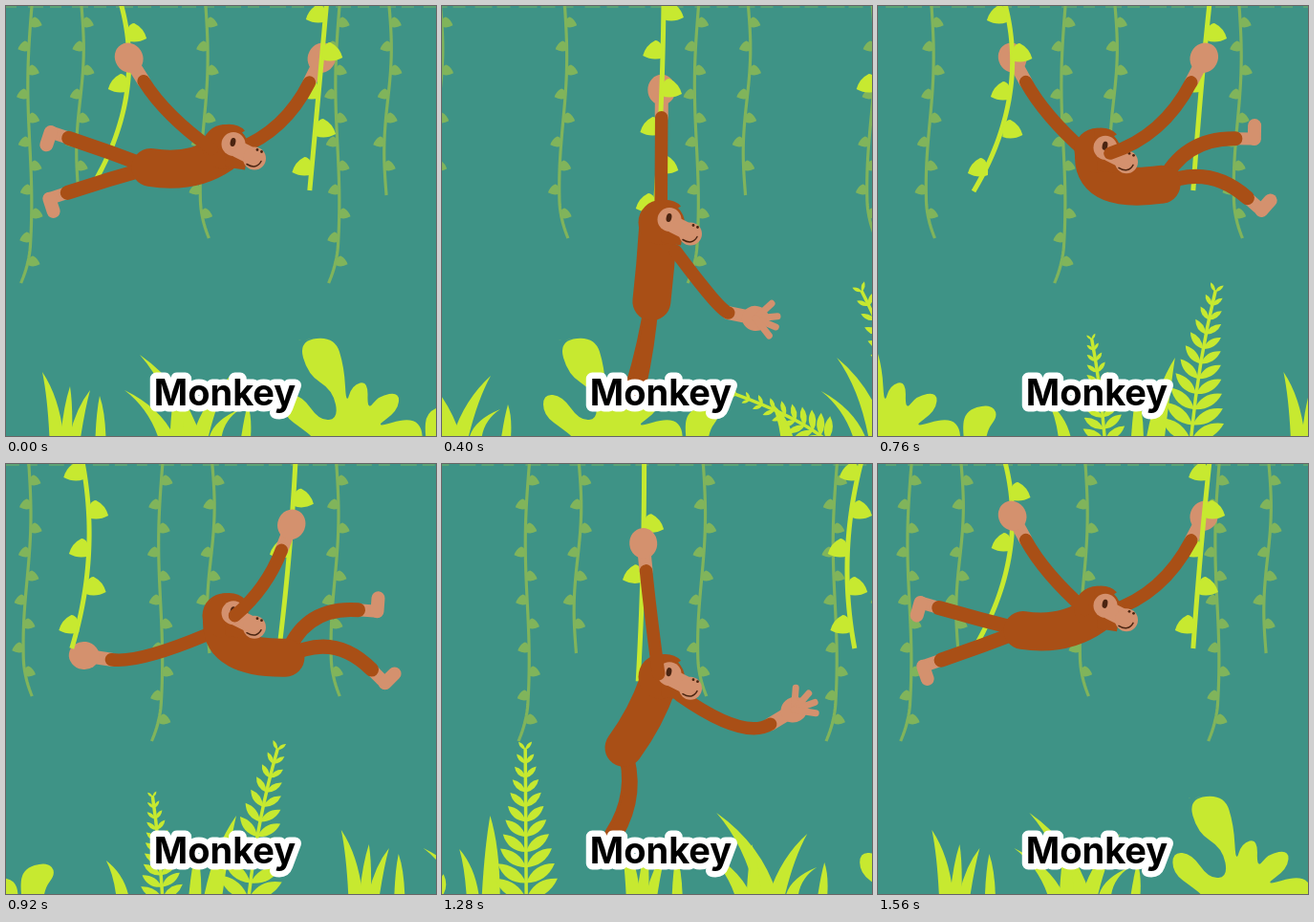
Write an HTML page with a canvas that moves like this. It is 450 px wide and 450 px high and loops after 1600 ms.

```html
<!DOCTYPE html>
<html lang="en">
<head>
<meta charset="utf-8">
<title>Swinging monkey</title>
<style>
html, body { margin: 0; width: 100%; height: 100%; overflow: hidden; background: #3e9386; }
canvas { display: block; width: 450px; height: 450px; }
</style>
</head>
<body>
<canvas id="stage" width="450" height="450"></canvas>
<script>
const ctx = document.getElementById('stage').getContext('2d');
const { PI, sin, cos, max, min, abs, hypot, atan2, exp } = Math;
const LOOP = 1600;
const BG = '#3e9386', DULL = '#80b45b', LIME = '#c7e930';
const FUR = '#a94f16', SKIN = '#d4916e', DARK = '#4a2411';
const VINE_STEP = 322, PLANT_STEP = 736;
// A hand holds its vine from GRAB to FREE, in ms of that vine's own cycle
const GRAB = 400, FREE = 1240;

const wave = (t, period) => cos(2 * PI * t / period);
const clamp = v => max(0, min(1, v));

function unit(x, y) {
  const l = hypot(x, y) || 1;
  return [x / l, y / l];
}

function disc(x, y, r, color) {
  ctx.fillStyle = color;
  ctx.beginPath();
  ctx.arc(x, y, r, 0, 7);
  ctx.fill();
}

function bend(x, y, cx, cy, ex, ey, width, color, cap = 'round') {
  ctx.strokeStyle = color;
  ctx.lineWidth = width;
  ctx.lineCap = cap;
  ctx.beginPath();
  ctx.moveTo(x, y);
  ctx.quadraticCurveTo(cx, cy, ex, ey);
  ctx.stroke();
}

const line = (x, y, ex, ey, width, color) => bend(x, y, x, y, ex, ey, width, color);

// Vines
function vineLeaf(x, y, side, size) {
  ctx.save();
  ctx.translate(x, y + 3);
  ctx.scale(side * size, size);
  ctx.beginPath();
  ctx.moveTo(0, 8);
  ctx.bezierCurveTo(-1, -4, 3, -10, 8, -10);
  ctx.quadraticCurveTo(18, -5, 21, 6);
  ctx.quadraticCurveTo(10, 12, 0, 8);
  ctx.fill();
  ctx.restore();
}

function vine(path, end, width, color, leaves, size) {
  ctx.strokeStyle = ctx.fillStyle = color;
  ctx.lineWidth = width;
  ctx.lineCap = 'butt';
  ctx.lineJoin = 'round';
  ctx.beginPath();
  for (let y = -4; y < end; y += 4) ctx.lineTo(path(y), y);
  ctx.lineTo(path(end), end);
  ctx.stroke();
  for (const [y, side] of leaves) vineLeaf(path(y), y, side, size);
}

function backVine(x, end, sway, hook) {
  const leaves = [];
  for (let y = 14, side = 1; y < end - 12; y += 25, side = -side) leaves.push([y, side]);
  const path = y => x - 3 * y / 200 + sway * sin(y / end * 6.3)
    + hook * max(0, (y - end + 40) / 40) ** 2;
  vine(path, end, 3.2, DULL, leaves, .56);
}

function backdrop(t) {
  ctx.fillStyle = BG;
  ctx.fillRect(0, 0, 450, 450);
  for (let x = -VINE_STEP * t / LOOP; x < 470; x += VINE_STEP) {
    ctx.fillStyle = 'rgba(127,181,95,.45)';
    for (let i = 0; i < 14; i++) ctx.fillRect(x + i * 23, 0, 11 + i * 5 % 9, 2);
    backVine(x + 27, 290, -3, -7);
    backVine(x + 79, 198, 3, 0);
    backVine(x + 209, 243, 3, 7);
  }
}

// Strong vine: drifts left, sags while held, whips back when let go
function rope(u) {
  const v = u - 760;
  const top = 252 - .25 * v - 1e-7 * v ** 3;
  const mid = -16 + .016 * u;
  const tail = u < 1040 ? -18 * sin(PI * u / 1040) : -34 * max(0, sin(PI * (u - 1040) / 360));
  const end = 193 + 38 * sin(PI * clamp((u - 440) / 800)) ** 2;
  const path = y => top + mid * y * (end - y) / (100 * (end - 100))
    + tail * y * (y - 100) / (end * (end - 100));
  return { path, end };
}

function grabVine(u, first, step, count, side) {
  const { path, end } = rope(u);
  const leaves = [];
  for (let i = 0; i < count; i++) leaves.push([end - first - i * step, i % 2 ? -side : side]);
  vine(path, end, 5, LIME, leaves, 1);
}

// Monkey
function held(u) {
  const y = 71 - 17 * wave(u - 420, 800);
  return [rope(u).path(y), y];
}

function reach(f) {
  const a = (33 + 291 * (f + .1 * sin(PI * f))) * PI / 180;
  const r = 160 + 18 * cos(2 * a);
  return [230 - r * sin(a), 200 - r * cos(a)];
}

// On the vine, or on a wide arc below the body to the next hold
function handAt(u) {
  if (u >= GRAB && u <= FREE) return [...held(u), 0];
  const f = (u - FREE + LOOP) % LOOP / (GRAB + LOOP - FREE);
  const from = held(FREE), to = held(GRAB), a = reach(0), b = reach(1);
  const [x, y] = reach(f).map((p, i) => p + (1 - f) * (from[i] - a[i]) + f * (to[i] - b[i]));
  return [x, y, clamp(5 * f - 1) * clamp(4 - 4 * f)];
}

function makeArm(u, faceY) {
  const [x, y, open] = handAt(u);
  const [sx, sy] = unit(x - 229, y - faceY - 20);
  const shoulder = [229 + 20 * sx, faceY + 20 + 20 * sy];
  const dx = x - shoulder[0];
  const elbow = [(shoulder[0] + x) / 2 + dx * .06, (shoulder[1] + y) / 2 + .24 * abs(dx) + .09 * dx];
  const [ex, ey] = unit(elbow[0] - x, elbow[1] - y);
  return { x, y, open, shoulder, elbow, wrist: [x + 29 * ex, y + 29 * ey] };
}

function drawHand({ x, y, open, wrist }) {
  line(...wrist, x, y, 14, SKIN);
  const dir = atan2(y - wrist[1], x - wrist[0]);
  ctx.save();
  ctx.translate(x, y);
  ctx.rotate(dir);
  ctx.scale(1.1, 1);
  disc(0, 0, 14.5 - 1.5 * open, SKIN);
  ctx.restore();
  if (!open) return;
  const far = 10 + 13 * open;
  for (const a of [-.95, -.3, .2, .7]) {
    line(x, y, x + cos(dir + a) * far, y + sin(dir + a) * far, 7, SKIN);
  }
}

const drawArm = ({ shoulder, elbow, wrist }) => bend(...shoulder, ...elbow, ...wrist, 13.5, FUR);

function leg(hx, hy, angle, bow) {
  const dx = sin(angle), dy = cos(angle);
  const ax = hx + 91 * dx, ay = hy + 91 * dy;
  const kx = (hx + ax) / 2 + bow * dy, ky = (hy + ay) / 2 - bow * dx;
  const [fx, fy] = unit(ax - kx, ay - ky);
  const ex = ax + fx * 20, ey = ay + fy * 20;
  line(ax, ay, ex, ey, 13, SKIN);
  line(ex, ey, ex + fy * 14, ey - fx * 14, 14, SKIN);
  bend(hx, hy, kx, ky, ax, ay, 15, FUR);
}

function head(y) {
  disc(229, y + 3, 23.5, FUR);
  ctx.beginPath();
  ctx.moveTo(226, y - 20);
  ctx.quadraticCurveTo(242, y - 23, 250, y - 14);
  ctx.lineTo(247, y - 12);
  ctx.quadraticCurveTo(254, y - 5, 254, y + 4);
  ctx.lineTo(250, y + 27);
  ctx.lineTo(230, y + 24);
  ctx.fill();
  disc(238, y, 12.5, SKIN);
  line(242, y + 5, 258, y + 13, 18, SKIN);
  disc(260, y + 15, 12, SKIN);
  ctx.fillStyle = DARK;
  ctx.beginPath();
  ctx.ellipse(237.5, y - 2, 2.8, 4.6, .2, 0, 7);
  ctx.fill();
  disc(263, y + 6, 1.4, DARK);
  disc(267.5, y + 8, 1.4, DARK);
  bend(252, y + 21, 262, y + 27, 267, y + 18, 1.5, DARK);
}

function torso(t, faceY) {
  const spine = (-5 - 74 * wave(t, LOOP)) * PI / 180;
  const nx = 226, ny = faceY + 10;
  const hx = nx + 76 * sin(spine), hy = ny + 76 * cos(spine);
  const chest = min(0, spine) * .7;
  const legs = (7 - 100 * wave(t - 45, LOOP)) * PI / 180;
  const bow = 15 + 20 * wave(t - 960, LOOP);
  const spread = abs(legs) * .2;
  leg(hx, hy, legs - spread, bow);
  leg(hx, hy, legs + spread, bow);
  bend(nx, ny, nx + 38 * sin(chest), ny + 38 * cos(chest), hx, hy, 40, FUR);
  head(faceY);
}

// Plants
function blade(x, w, tx, ty, lean = .3) {
  const mx = x + (tx - x) * lean, my = 450 + (ty - 450) * .6;
  ctx.beginPath();
  ctx.moveTo(x - w / 2, 452);
  ctx.quadraticCurveTo(mx - w / 3, my, tx, ty);
  ctx.quadraticCurveTo(mx + w / 2, my, x + w / 2, 452);
  ctx.fill();
}

// Closed smooth outline through the middles of its sides
function blob(x, points) {
  const n = points.length;
  ctx.beginPath();
  for (let i = 0; i <= n; i++) {
    const [px, py] = points[i % n], [qx, qy] = points[(i + 1) % n];
    ctx.quadraticCurveTo(x + px, py, x + (px + qx) / 2, (py + qy) / 2);
  }
  ctx.fill();
}

const BROAD = [
  [30, 350], [68, 346], [78, 378], [80, 418], [86, 397], [103, 392], [102, 424],
  [114, 408], [136, 404], [134, 424], [108, 442], [148, 430], [162, 445], [155, 480],
  [60, 480], [46, 452], [36, 444], [14, 428], [14, 406], [34, 408], [52, 434],
  [72, 432], [66, 402], [40, 386]
];
const BUD = [[170, 480], [162, 450], [164, 424], [190, 416], [200, 428], [186, 446], [186, 480]];

function fern(x, dx, dy, pairs, size) {
  const cx = x + dx * .3, cy = 455 + dy * .55, tx = x + dx, ty = 450 + dy;
  bend(x, 455, cx, cy, tx, ty, 3.5, LIME);
  for (let i = 0; i <= pairs; i++) {
    const s = i / pairs, r = 1 - s;
    const px = r * r * x + 2 * r * s * cx + s * s * tx;
    const py = r * r * 455 + 2 * r * s * cy + s * s * ty;
    const dir = atan2(r * (cy - 455) + s * (ty - cy), r * (cx - x) + s * (tx - cx));
    const len = size * (.28 + .72 * r);
    for (const side of [-1, 1]) {
      ctx.save();
      ctx.translate(px, py);
      ctx.rotate(dir + side * (1 - .3 * s));
      ctx.beginPath();
      ctx.moveTo(0, 0);
      ctx.quadraticCurveTo(len * .5, -len * .36, len, 0);
      ctx.quadraticCurveTo(len * .5, len * .32, 0, 0);
      ctx.fill();
      ctx.restore();
    }
  }
}

function plants(t, x) {
  ctx.fillStyle = LIME;
  // Left tuft
  blade(x + 53, 15, x + 38, 383);
  blade(x + 63, 12, x + 67, 398);
  blade(x + 72, 12, x + 88, 402);
  blade(x + 99, 11, x + 98, 408, .8);
  // Wide tuft
  blade(x + 193, 22, x + 140, 365);
  blade(x + 168, 17, x + 124, 402);
  blade(x + 179, 15, x + 177, 398, .5);
  blade(x + 203, 17, x + 235, 387);
  blade(x + 219, 13, x + 245, 422, .1);
  blade(x + 251, 10, x + 253, 417, .8);
  // Broad leaf
  blob(x + 276, BROAD);
  blob(x + 276, BUD);
  // Reeds and ferns, swaying less and less
  const sway = 60 * exp((400 - t) / 600) * sin(2 * PI * (t - 640) / 1120);
  blade(x + 545, 13, x + 528, 415);
  blade(x + 621, 13, x + 610 + sway * .5, 403);
  blade(x + 640, 19, x + 644 + sway * .8, 368);
  const nod = -50 - 45 * wave(t - 400, 900);
  fern(x + 587, nod, .0065 * nod * nod - 102, 9, 26);
  fern(x + 677, sway + 5, -151, 10, 39);
}

function label() {
  ctx.font = '700 38px Inter, sans-serif';
  ctx.textAlign = 'center';
  ctx.lineJoin = 'round';
  ctx.lineWidth = 13;
  ctx.strokeStyle = '#fff';
  ctx.strokeText('Monkey', 229, 418);
  ctx.fillStyle = '#000';
  ctx.fillText('Monkey', 229, 418);
}

function draw(t) {
  // Both arms and vines share one cycle, half a loop apart
  const u = (t - 360 + LOOP) % LOOP, w = (u + LOOP / 2) % LOOP;
  const faceY = 184 - 40 * wave(t - 20, LOOP / 2);
  const near = makeArm(u, faceY), far = makeArm(w, faceY);
  backdrop(t);
  grabVine(u, 115, 53, 2, -1);
  drawHand(far);
  grabVine(w, 28, 40, 6, -1);
  drawArm(far);
  torso(t, faceY);
  drawHand(near);
  drawArm(near);
  const x = -PLANT_STEP * t / LOOP;
  plants(t, x);
  plants(t, x + PLANT_STEP);
  label();
}

const start = performance.now();
function tick() {
  const now = max(0, performance.now() - start) % LOOP;
  draw(Math.floor(now / 40) * 40);
  requestAnimationFrame(tick);
}
tick();
</script>
</body>
</html>
```
